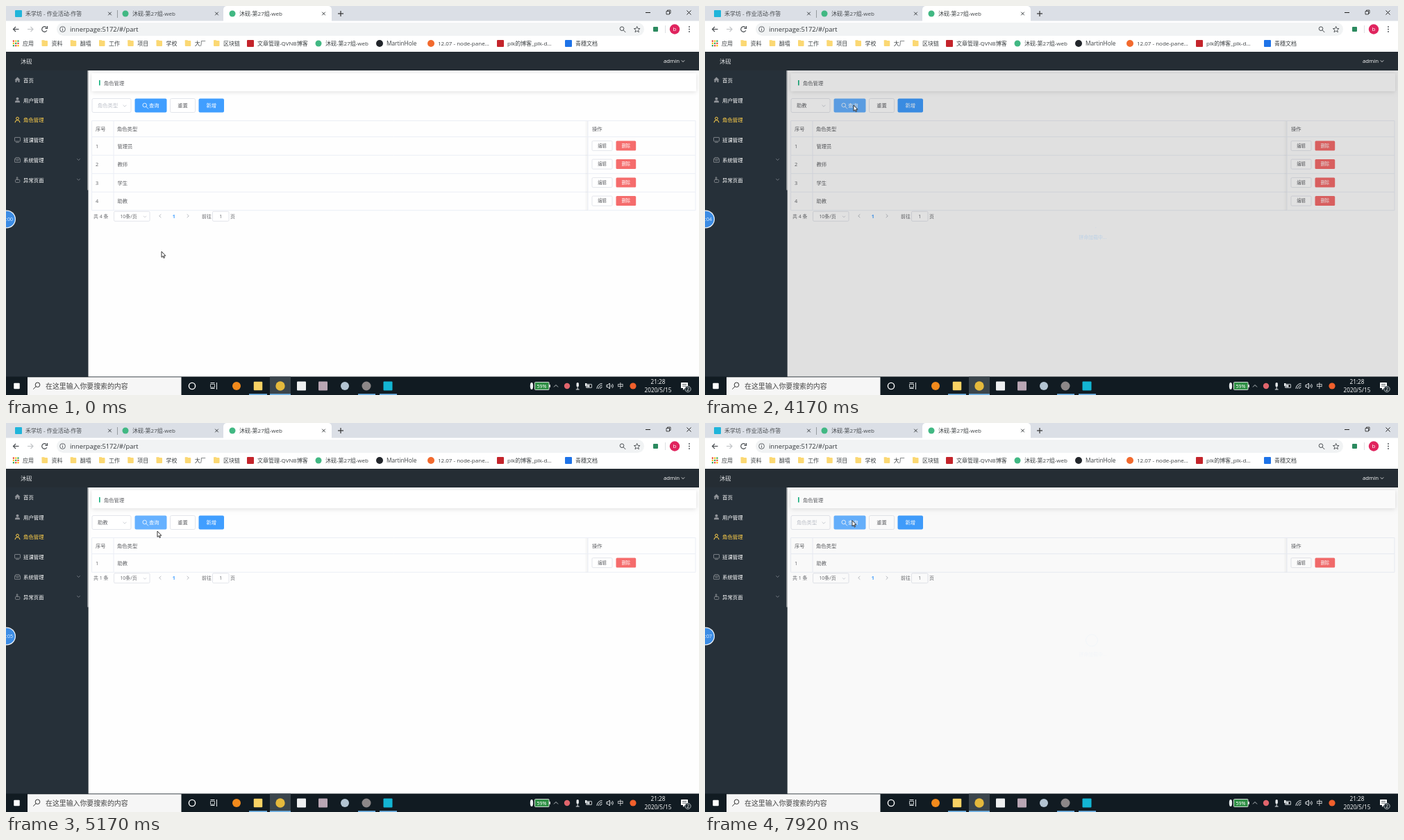
These frames come from a looping animation (998 by 561 pixels, 8 s). An HTML page with a canvas:

```html
<!DOCTYPE html>
<html lang="zh-CN">
<head>
<meta charset="utf-8">
<title>角色管理</title>
<style>
html, body { margin: 0; width: 100%; height: 100%; overflow: hidden; background: #fff; }
canvas { display: block; width: 998px; height: 561px; }
</style>
</head>
<body>
<canvas id="stage" width="998" height="561"></canvas>
<script>
const c = document.getElementById('stage').getContext('2d');
const LOOP = 8000, FPS = 12;
const FONT = '"Open Sans", "Noto Sans CJK SC", "Noto Sans CJK JP", sans-serif';
const BLUE = '#409eff', LIGHT_BLUE = '#66b1ff', INK = '#606266', LINE = '#ebeef5', BORDER = '#dcdfe6';
const ROLES = ['管理员', '教师', '学生', '助教'];
const TEAM = '沐砚-第27组-web';

const OPEN = 1500, PICK = 3080, QUERY = 4060, LOADED = 4520, RESET = 6600, QUERY2 = 7860;

// Pointer path: time, x, y
const PATH = [
  [0, 224, 354], [400, 224, 354], [1250, 158, 145], [1900, 156, 148], [2700, 154, 219],
  [3100, 154, 219], [3800, 214, 143], [4750, 214, 143], [5170, 218, 156], [5700, 222, 161],
  [6300, 254, 144], [6750, 254, 144], [7200, 212, 141], [8000, 212, 140.5]
];

const clamp = v => Math.max(0, Math.min(1, v));
const ease = v => { v = clamp(v); return v * v * (3 - 2 * v); };
const inside = (p, x, y, w, h) => p.x >= x && p.x < x + w && p.y >= y && p.y < y + h;

function pointerAt(t) {
  let i = 0;
  while (i < PATH.length - 2 && t >= PATH[i + 1][0]) i++;
  const [ta, xa, ya] = PATH[i], [tb, xb, yb] = PATH[i + 1];
  const k = ease((t - ta) / (tb - ta));
  return { x: xa + (xb - xa) * k, y: ya + (yb - ya) * k };
}

function text(s, x, y, size, color, align = 'left', weight = 400) {
  c.font = `${weight} ${size}px ${FONT}`;
  c.textAlign = align;
  c.fillStyle = color;
  c.fillText(s, x, y + size * 0.37);
}
function rect(x, y, w, h, color) {
  c.fillStyle = color;
  c.fillRect(x, y, w, h);
}
function box(x, y, w, h, r, fill, stroke) {
  c.beginPath();
  c.roundRect(x, y, w, h, r);
  if (fill) { c.fillStyle = fill; c.fill(); }
  if (stroke) { c.strokeStyle = stroke; c.lineWidth = 0.8; c.stroke(); }
}
function dot(x, y, r, color) {
  c.beginPath();
  c.arc(x, y, r, 0, 7);
  c.fillStyle = color;
  c.fill();
}
function ring(x, y, r, color, w = 1) {
  c.beginPath();
  c.arc(x, y, r, 0, 7);
  c.strokeStyle = color;
  c.lineWidth = w;
  c.stroke();
}
function line(color, w, ...pts) {
  c.beginPath();
  for (let i = 0; i < pts.length; i += 2) c.lineTo(pts[i], pts[i + 1]);
  c.strokeStyle = color;
  c.lineWidth = w;
  c.stroke();
}
function square(x, y, s, color) { box(x - s / 2, y - s / 2, s, s, 1, color); }
function cross(x, y, r, color) {
  line(color, 1, x - r, y - r, x + r, y + r);
  line(color, 1, x + r, y - r, x - r, y + r);
}
// d: 1 points down, -1 points up
function chevron(x, y, r, color, d = 1) { line(color, 0.8, x - r, y - d * r / 2, x, y + d * r / 2, x + r, y - d * r / 2); }
function sideChevron(x, y, d, color) { line(color, 0.8, x - d, y - 2.4, x + d, y, x - d, y + 2.4); }
function lens(x, y, r, color, w, dx = 1) {
  ring(x, y, r, color, w);
  line(color, w, x + dx * r * 0.7, y + r * 0.7, x + dx * r * 1.9, y + r * 1.9);
}

function drawBrowser() {
  rect(0, 0, 998, 22, '#dbdfe6');
  box(313, 0, 156, 26, 5, '#fff');
  rect(0, 21.5, 998, 44.5, '#fff');
  square(18, 11, 10, '#20b5da');
  text('禾学坊 - 作业活动-作答', 28, 11, 8, '#45494d');
  dot(172, 11, 4.5, '#41b883');
  text(TEAM, 182, 11, 8, '#45494d');
  dot(326, 11, 4.5, '#41b883');
  text(TEAM, 336, 11, 8, '#3c4043');
  for (const x of [149.5, 303.5, 457.5]) cross(x, 11, 2.3, '#3c4043');
  line('#85898f', 0.8, 160.5, 6, 160.5, 17);
  line('#333', 1.2, 478, 11, 486, 11);
  line('#333', 1.2, 482, 7, 482, 15);
  line('#222', 1, 921, 9.5, 928, 9.5);
  box(951, 7.5, 4.5, 4.5, 0, null, '#222');
  line('#222', 0.8, 952.5, 7.5, 952.5, 6, 957, 6, 957, 10.5, 955.5, 10.5);
  cross(983.5, 9.5, 3, '#222');

  line('#4a4e52', 1.2, 18.5, 33.5, 10.5, 33.5);
  line('#4a4e52', 1.2, 14, 30, 10.5, 33.5, 14, 37);
  line('#c4c6c9', 1.2, 31, 33.5, 39, 33.5);
  line('#c4c6c9', 1.2, 35.5, 30, 39, 33.5, 35.5, 37);
  c.beginPath();
  c.arc(55.5, 33.5, 3.8, 0.5, 5.6);
  c.strokeStyle = '#4a4e52';
  c.lineWidth = 1.2;
  c.stroke();
  line('#4a4e52', 1.2, 59.5, 29, 59.5, 32.3, 56.3, 32.3);
  box(73, 24, 846, 19, 9.5, '#f1f3f4');
  ring(81.5, 33.5, 3.9, '#5f6368');
  rect(81, 33, 1, 2.7, '#5f6368');
  rect(81, 31.2, 1, 1, '#5f6368');
  text('innerpage:5172/#/part', 92, 33.2, 9.3, '#33373b');
  lens(887, 32.7, 2.8, '#4a4e52', 1);
  c.beginPath();
  for (let i = 0; i < 10; i++) {
    const a = i * Math.PI / 5 - Math.PI / 2, r = i % 2 ? 2 : 4.6;
    c.lineTo(908.7 + r * Math.cos(a), 34 + r * Math.sin(a));
  }
  c.closePath();
  c.strokeStyle = '#4a4e52';
  c.lineWidth = 0.9;
  c.stroke();
  square(935.5, 33.5, 7, '#2c8a5f');
  line('#d5d8dc', 0.8, 949.5, 28, 949.5, 39);
  dot(963, 33.5, 7.2, '#e0245e');
  text('b', 963, 33.3, 8, '#fff', 'center');
  for (const y of [30, 33.5, 37]) dot(984, y, 0.9, '#4a4e52');

  drawBookmarks();
}

function drawBookmarks() {
  const y = 54, ink = '#3c4043';
  const hues = ['#ea4335', '#fbbc04', '#34a853'];
  for (let i = 0; i < 9; i++) rect(9.8 + (i % 3) * 3.3, 49.5 + Math.floor(i / 3) * 3.3, 2.2, 2.2, hues[(i + Math.floor(i / 3)) % 3]);
  text('应用', 24, y, 8, ink);
  ['资料', '翻墙', '工作', '项目', '学校', '大厂', '区块链'].forEach((s, i) => {
    const x = 51.5 + i * 41.25;
    box(x, 50, 8.5, 8, 1, '#fbd873');
    rect(x, 49.2, 4, 2, '#fbd873');
    text(s, x + 14, y, 8, ink);
  });
  square(352, y, 10, '#c4242b');
  text('文章管理-QVNB博客', 362, y, 8, ink);
  dot(450, y, 4.5, '#41b883');
  text(TEAM, 460, y, 8, ink);
  dot(538, y, 5, '#22262b');
  text('MartinHole', 548, y, 8.3, ink);
  dot(612, y, 5, '#f26a2e');
  text('12.07 - node-pane...', 622, y, 8, ink);
  square(712, y, 10, '#c4242b');
  text('plk的博客_plk-d...', 722, y, 8, ink);
  square(810, y, 10, '#1e73e8');
  text('青穗文档', 820, y, 8, ink);
}

function drawMenuIcon(i, y, color) {
  const x = 16.5;
  if (i === 0) {
    c.beginPath();
    [[-4, 0], [0, -4], [4, 0], [3, 0], [3, 3.6], [1, 3.6], [1, 1], [-1, 1], [-1, 3.6], [-3, 3.6], [-3, 0]].forEach(([a, b]) => c.lineTo(x + a, y + b));
    c.fillStyle = color;
    c.fill();
  } else if (i === 1) {
    dot(x, y - 1.7, 2, color);
    box(x - 3.5, y + 0.8, 7, 3, [2, 2, 0, 0], color);
  } else if (i === 2) {
    ring(x, y - 2, 1.9, color);
    c.beginPath();
    c.arc(x, y + 4, 3.5, Math.PI, 0);
    c.stroke();
  } else if (i === 3) {
    box(x - 4, y - 3.5, 8, 5.5, 0.5, null, color);
    line(color, 0.8, x - 2.3, y + 3.6, x + 2.3, y + 3.6);
  } else if (i === 4) {
    box(x - 4, y - 1, 8, 4.5, 0.5, null, color);
    line(color, 0.8, x - 4, y - 1, x - 2.5, y - 3.3, x + 2.5, y - 3.3, x + 4, y - 1);
    line(color, 0.8, x - 2, y + 1, x + 2, y + 1);
  } else {
    box(x - 3, y - 0.3, 6.3, 4, 1, null, color);
    line(color, 0.8, x - 1.2, y, x - 1.2, y - 3.8, x + 0.3, y - 3.8, x + 0.3, y);
  }
}

function drawShell(t) {
  rect(0, 66, 998, 27, '#252d34');
  rect(0, 93, 118.5, 442, '#263039');
  text('沐砚', 21, 80, 8.2, '#e4e6e8');
  text('admin', 947, 79, 7.8, '#fff');
  chevron(975, 79.5, 2.2, '#fff');
  ['首页', '用户管理', '角色管理', '班课管理', '系统管理', '异常页面'].forEach((s, i) => {
    const y = 107 + i * 28.85, on = i === 2;
    drawMenuIcon(i, y - 0.5, on ? '#ffd04b' : '#909399');
    text(s, 25, y, 7.4, on ? '#ffd04b' : '#fff', 'left', 500);
    if (i > 3) chevron(104.5, y - 1, 2.2, '#858b92');
  });
  rect(117.5, 93, 1, 172.5, '#e6e6e6');

  dot(1, 307.5, 13, '#f4f8fc');
  dot(1, 307.5, 11.8, '#3c8ce4');
  text('00:0' + Math.floor(t / 1000), 1, 307.5, 7, '#e6f2ff', 'center');
}

function button(label, x, w, fill, stroke, ink) {
  box(x, 133.5, w, 20, 2, fill, stroke);
  text(label, x + w / 2, 143.5, 7.3, ink, 'center', 500);
}

function drawForm(t, p, loading) {
  const picked = t >= PICK && t < RESET;
  const focused = t >= OPEN && t < QUERY;
  const opened = t >= OPEN && t < PICK;
  const hover = (x, w) => !loading && inside(p, x, 133.5, w, 20);
  box(124, 133.5, 56, 20, 2, '#fff', focused ? BLUE : hover(124, 56) ? '#c0c4cc' : BORDER);
  text(picked ? '助教' : '角色类型', 132, 143.5, 7.3, picked ? INK : '#c0c4cc');
  chevron(171, 144, 2.4, '#c0c4cc', opened ? -1 : 1);

  const active = (t >= QUERY && t < RESET) || t >= QUERY2 || hover(185.5, 46);
  box(185.5, 133.5, 46, 20, 2, active ? LIGHT_BLUE : BLUE);
  lens(199.7, 143, 2.8, '#fff', 0.8);
  text('查询', 206, 143.5, 7.3, '#fff', 'left', 500);

  if ((t >= RESET && t < QUERY2) || hover(236.5, 36)) button('重置', 236.5, 36, '#ecf5ff', '#c6e2ff', BLUE);
  else button('重置', 236.5, 36, '#fff', BORDER, INK);
  button('新增', 277.5, 36.5, hover(277.5, 36.5) ? LIGHT_BLUE : BLUE, null, '#fff');
}

function drawTable(rows, p) {
  const top = 165.5, head = 188.7, h = 26.5, bottom = head + rows.length * h;
  text('序号', 129, 177.3, 7.3, INK);
  text('角色类型', 160, 177.3, 7.3, INK);
  text('操作', 844, 177.3, 7.3, INK);
  rows.forEach((name, i) => {
    const y = head + i * h, mid = y + 13.2;
    if (inside(p, 124, y, 869, h)) rect(124, y, 869, h, '#f5f7fa');
    text(i + 1, 129, mid, 7.3, INK);
    text(name, 160.5, mid, 7.3, INK);
    box(844, mid - 7.3, 29, 14, 1.5, '#fff', BORDER);
    text('编辑', 858.5, mid - 0.4, 6.3, INK, 'center', 500);
    box(878.5, mid - 7.3, 28.7, 14, 1.5, '#f56c6c');
    text('删除', 892.8, mid - 0.4, 6.3, '#fff', 'center', 500);
    line(LINE, 1, 123.5, y + h, 993, y + h);
  });
  const shade = c.createLinearGradient(833, 0, 838, 0);
  shade.addColorStop(0, 'rgba(0,0,0,0)');
  shade.addColorStop(1, 'rgba(0,0,0,.05)');
  rect(833, top, 5, bottom - top, shade);
  line(LINE, 1, 123.5, head, 993, head);
  line(LINE, 1, 123.5, bottom, 123.5, top, 993, top, 993, bottom);
  for (const x of [155, 838]) line(LINE, 1, x, top, x, bottom);
  drawPager(rows.length, bottom + 8.6);
}

function drawPager(total, y) {
  text(`共 ${total} 条`, 126, y, 6.9, INK);
  box(155.5, y - 7, 51.5, 14, 1.5, '#fff', BORDER);
  text('10条/页', 176.5, y, 6.9, INK, 'center');
  chevron(200, y + 0.5, 2, '#c0c4cc');
  sideChevron(222, y - 0.5, -1.3, '#a8abb2');
  text('1', 241.7, y, 7, BLUE, 'center', 700);
  sideChevron(262, y - 0.5, 1.3, '#a8abb2');
  text('前往', 282, y, 6.9, INK);
  box(297.5, y - 7, 23.5, 14, 1.5, '#fff', BORDER);
  text('1', 309.2, y, 6.9, INK, 'center');
  text('页', 323, y, 6.9, INK);
}

function drawDropdown(t, p) {
  const k = ease((t - OPEN) / 300) - ease((t - PICK) / 300);
  if (k <= 0) return;
  c.save();
  c.globalAlpha = k;
  c.translate(0, 160);
  c.scale(1, k);
  c.translate(0, -160);
  c.shadowColor = 'rgba(0,0,0,.12)';
  c.shadowBlur = 6;
  c.shadowOffsetY = 1;
  box(124, 160, 56, 77, 2, '#fff', '#e4e7ed');
  c.shadowColor = 'transparent';
  ROLES.forEach((s, i) => {
    const y = 172 + i * 17.7, chosen = t >= PICK && i === 3;
    if (inside(p, 124, y - 8.8, 56, 17.7)) rect(124.5, y - 8.8, 55, 17.7, '#f5f7fa');
    text(s, 134.5, y, 7.3, chosen ? BLUE : INK, 'left', chosen ? 700 : 400);
  });
  c.restore();
}

function drawLoading(t, k) {
  if (k <= 0) return;
  rect(118.5, 93, 879.5, 442, `rgba(0,0,0,${0.5 * k})`);
  c.save();
  c.globalAlpha = k;
  text('拼命加载中...', 558.5, 333, 6.9, BLUE, 'center');
  const since = (t - 4417) / 1000, mid = Math.PI / 2 + since * Math.PI, half = 0.45 + Math.max(-0.4, since * 2);
  c.beginPath();
  c.arc(557, 313.5, 8.5, mid - half, mid + half);
  c.strokeStyle = BLUE;
  c.lineWidth = 1;
  c.stroke();
  c.restore();
}

function drawPage(t, p, fade) {
  rect(118.5, 93, 879.5, 442, '#fefefe');
  c.save();
  c.shadowColor = 'rgba(0,0,0,.13)';
  c.shadowBlur = 6;
  c.shadowOffsetY = 1;
  box(123.5, 97, 870.5, 26, 1, '#fff');
  c.restore();
  rect(134, 107, 1.6, 7.5, '#12b07c');
  text('角色管理', 141, 111, 7.3, INK);
  drawForm(t, p, fade > 0);
  drawTable(t < LOADED ? ROLES : ['助教'], p);
  drawDropdown(t, p);
  drawLoading(t, fade);
}

function drawTaskbar() {
  const y = 548, pale = '#e8ecee';
  rect(0, 534.5, 998, 26.5, '#111b22');
  square(15.5, y, 8.5, '#fff');
  rect(31, 535.3, 221.5, 25.7, '#f6f6f6');
  lens(45.5, 546.3, 3.3, '#333', 1, -1);
  text('在这里输入你要搜索的内容', 57, y, 9.9, '#444');
  ring(268, y, 4.6, '#fff', 1.4);
  for (const dy of [-4.5, 3.5]) line(pale, 1, 294.5, y + dy, 300.5, y + dy);
  box(294.5, y - 2.5, 6, 4.5, 0, null, pale);
  line(pale, 1, 303.5, y - 5, 303.5, y + 5);
  rect(380, 534.5, 30, 26.5, '#3b454c');
  dot(332, y, 6, '#f28a1c');
  square(363, y, 12.5, '#f8d264');
  dot(395, y, 6.7, '#e5b93c');
  square(425.5, y, 13, '#eef0f1');
  square(456.5, y, 13, '#b9a6b4');
  dot(488, y, 6, '#b3c4d2');
  dot(519, y, 6.5, '#8c8788');
  square(550, y, 13, '#13b5d3');
  for (const [x, w] of [[350, 26], [380, 30], [507, 25], [538, 25]]) rect(x, 559.3, w, 1.7, '#76b9ed');

  c.beginPath();
  c.ellipse(757, y, 2.2, 5, 0, 0, 7);
  c.fillStyle = pale;
  c.fill();
  box(761.5, 542.5, 20.5, 11, 1, '#2f8f45', '#fff');
  rect(782.3, 546, 1.5, 4, '#fff');
  text('59%', 771.5, y, 7, '#fff', 'center');
  chevron(792, y, 3, pale, -1);
  dot(808, y, 4.2, '#e0656c');
  box(821.5, 543, 3.4, 6.5, 1.7, pale);
  line(pale, 1, 823.2, 549.5, 823.2, 553);
  line(pale, 1, 820.8, 553, 825.6, 553);
  box(835.5, 545.5, 8, 5, 0.5, null, pale);
  rect(836.5, 546.5, 4, 3, pale);
  rect(834, 544, 2.5, 4, pale);
  for (const r of [2.5, 5, 7.5]) {
    c.beginPath();
    c.arc(858.5, 552, r, Math.PI, Math.PI * 1.5);
    c.strokeStyle = pale;
    c.lineWidth = 1;
    c.stroke();
  }
  c.beginPath();
  [[865, 546.5], [867, 546.5], [869.3, 544], [869.3, 552], [867, 549.5], [865, 549.5]].forEach(q => c.lineTo(...q));
  c.closePath();
  c.stroke();
  for (const r of [2, 4.2]) {
    c.beginPath();
    c.arc(870, y, r, -0.8, 0.8);
    c.stroke();
  }
  text('中', 885, y, 8.8, '#fff', 'center');
  dot(903, y, 4.6, '#f2602c');
  text('21:28', 939, 542, 8.2, '#fff', 'center');
  text('2020/5/15', 939, 554, 8.2, '#fff', 'center');
  box(972, 543, 10, 8, 0.5, '#fff');
  c.beginPath();
  c.moveTo(975, 551);
  c.lineTo(975, 554);
  c.lineTo(978, 551);
  c.fill();
  for (const ly of [545.5, 548]) line('#111b22', 0.7, 974, ly, 980, ly);
  dot(982, 552.5, 4.4, '#1f2a31');
  ring(982, 552.5, 4.2, '#cfd6da', 0.8);
  text('2', 982, 552.5, 6.5, '#fff', 'center');
}

function drawPointer(t, p, fade) {
  const clickable = inside(p, 185.5, 133.5, 46, 20) || inside(p, 236.5, 133.5, 77.5, 20) || inside(p, 124, 133.5, 56, 20);
  const inMenu = t > OPEN + 150 && t < PICK + 150 && inside(p, 124, 153, 56, 84);
  const hand = fade <= 0 && (clickable || inMenu);
  const shape = hand
    ? [[-1, 0.8], [0, 0], [1, 0.8], [1, 4], [2.4, 3.9], [2.8, 4.6], [4.2, 4.6], [4.6, 5.4], [5.7, 5.6], [5.7, 9], [4.6, 12.2], [-0.6, 12.2], [-3.6, 7.6], [-3, 6.6], [-1, 8]]
    : [[0, 0], [0, 8.4], [1.9, 6.7], [3.2, 9.6], [4.5, 9], [3.2, 6.2], [5.8, 6.2]];
  c.beginPath();
  for (const [x, y] of shape) c.lineTo(p.x + x, p.y + y);
  c.closePath();
  c.lineJoin = 'round';
  c.fillStyle = '#fff';
  c.fill();
  c.strokeStyle = '#222';
  c.lineWidth = 0.9;
  c.stroke();
  c.lineJoin = 'miter';
  if (hand) for (const x of [1, 2.8, 4.4]) line('#333', 0.6, p.x + x, p.y + 4.5, p.x + x, p.y + 7);
}

function draw(t) {
  const p = pointerAt(t);
  const fade = ease((t - 4073) / 300) - ease((t - LOADED) / 300) + ease((t - 7881) / 300);
  drawBrowser();
  drawPage(t, p, fade);
  drawShell(t);
  drawTaskbar();
  drawPointer(t, p, fade);
}

let last = -1;
const start = performance.now();
function tick() {
  const t = (performance.now() - start) % LOOP;
  let step = Math.floor((t + 4) * FPS / 1000) % (LOOP * FPS / 1000);
  if (step % 6 === 3) step--;
  if (step !== last) {
    last = step;
    draw(step * 1000 / FPS);
  }
  requestAnimationFrame(tick);
}
tick();
</script>
</body>
</html>
```
